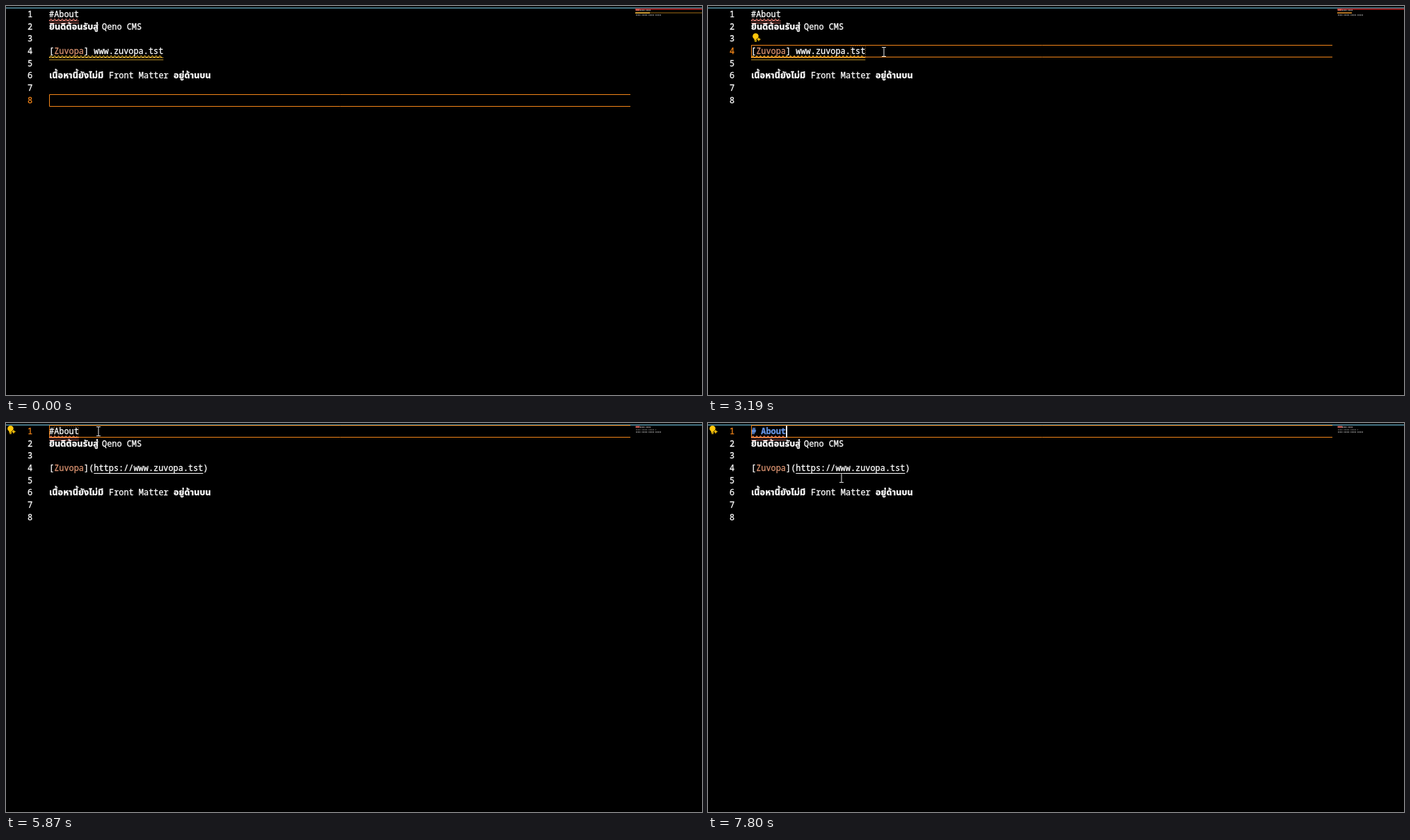
Animation of 1001x560 px, one loop 8000 ms. Source, as an HTML page with a canvas:

```html
<!DOCTYPE html>
<html lang="th">
<head>
<meta charset="utf-8">
<style>
html, body { margin: 0; width: 100%; height: 100%; overflow: hidden; background: #000 }
canvas { display: block }
</style>
</head>
<body>
<canvas id="stage" width="1001" height="560"></canvas>
<script>
const c = document.getElementById('stage').getContext('2d');
const LOOP = 8000, LEFT = 62, CHAR = 7.146, PITCH = 17.66;
const ORANGE = '#f38518', TEAL = '#6fc3df', YELLOW = '#ffc60a', SALMON = '#ec8478', GOLD = '#f2bd35';
const THAI = '"Noto Sans Thai", "Noto Sans", sans-serif';
const MONO = '11.91px "Noto Sans Mono", monospace';
const THAI_CODE = '600 12.8px ' + THAI;
const UI = '600 11.2px "Open Sans", sans-serif';
const THAI_UI = '600 12.1px ' + THAI;

const SELECT_LINK = 1660, HIGHLIGHT = 1790, BULB = 1990, MENU_LINK = 3250, FIX_LINK = 4535;
const SELECT_TITLE = 5410, BULB_TITLE = 5680, MENU_TITLE = 6270, FIX_TITLE = 7600;

// time, x, y of the pointer
const PATH = [
  [240, 640, 560], [980, 258, 66], [1120, 253, 66], [3850, 253, 66], [4190, 294, 105],
  [4535, 298, 112], [4670, 298, 112], [5070, 133, 12], [6840, 133, 12], [6869, 142, 12],
  [7300, 184, 86], [7460, 190, 77]
];

const within = (t, a, b) => t >= a && t < b;
const column = i => LEFT + i * CHAR;
const baseline = n => Math.round(16 + PITCH * (n - 1));

function text(s, x, y, color = '#fff', font = MONO) {
  c.font = font;
  c.fillStyle = c.strokeStyle = color;
  c.lineWidth = 0.3;
  c.fillText(s, x, y);
  c.strokeText(s, x, y);
}
function rect(x, y, w, h, color) {
  c.fillStyle = color;
  c.fillRect(x, y, w, h);
}
function frame(x, y, w, h, color, dash = []) {
  c.strokeStyle = color;
  c.lineWidth = 1;
  c.setLineDash(dash);
  c.strokeRect(x, y, w, h);
  c.setLineDash([]);
}
function rounded(x, y, w, h, r, stroke, fill) {
  c.beginPath();
  c.roundRect(x, y, w, h, r);
  if (fill) { c.fillStyle = fill; c.fill(); }
  c.strokeStyle = stroke;
  c.lineWidth = 1;
  c.stroke();
}

function squiggle(x0, x1, y, color) {
  c.beginPath();
  for (let x = x0, up = 0; x <= x1; x += 2.7, up ^= 1) c.lineTo(x, y + (up ? -1.3 : 1.3));
  c.strokeStyle = color;
  c.lineWidth = 1.1;
  c.stroke();
  c.globalAlpha = 0.75;
  rect(x0, y + 1, x1 - x0, 1, color);
  rect(x0, y + 4, x1 - x0, 1, color);
  c.globalAlpha = 1;
}

function star(x, y, r) {
  c.beginPath();
  for (let i = 0; i < 8; i++) {
    const a = i * Math.PI / 4, d = i % 2 ? r * 0.42 : r;
    c.lineTo(x + d * Math.cos(a), y + d * Math.sin(a));
  }
  c.closePath();
}
function bulb(x, y, sparkle) {
  c.fillStyle = YELLOW;
  c.beginPath();
  c.arc(x, y, 4.3, 0, 7);
  c.fill();
  c.fillRect(x - 2, y + 3, 4, 3);
  c.fillRect(x - 1.5, y + 6.5, 3, 1.3);
  if (!sparkle) return;
  star(x + 4.5, y + 4.5, 4.4);
  c.fillStyle = '#000';
  c.fill();
  star(x + 4.5, y + 4.5, 3.2);
  c.fillStyle = YELLOW;
  c.fill();
}
function sparkles(x, y) {
  c.strokeStyle = '#f0f0f0';
  c.lineWidth = 1.2;
  star(x - 2.5, y - 2, 4.3);
  c.stroke();
  star(x + 3.6, y + 2.8, 2.7);
  c.stroke();
}

function menu(x, y, w, h, fixes, pointer) {
  rounded(x, y, w, h, 4, TEAL, '#0c141f');
  text('Quick Fix', x + 11.5, y + 21.5, '#b4b8bc', UI);
  const inside = pointer.x > x && pointer.y > y;
  const focus = inside ? Math.floor((pointer.y - y - 29.8) / 22.5) : 0;
  const items = [...fixes, [['Fix', 34, UI]], [['Explain', 34, UI]]];
  items.forEach((parts, i) => {
    const mid = y + 39.5 + i * 22.5;
    if (i === focus) rounded(x + 4.5, mid - 11, w - 9, 21, 3, ORANGE);
    if (i < fixes.length) bulb(x + 19.5, mid - 2.5);
    else sparkles(x + 19.5, mid - 0.5);
    for (const [s, dx, font] of parts) text(s, x + dx, mid + 4.5, '#fff', font);
  });
}

function pointerAt(t) {
  const i = PATH.findIndex(p => p[0] > t);
  if (i < 0) { const [, x, y] = PATH[PATH.length - 1]; return t < 7800 ? { x, y } : { x: 192, y: 79 }; }
  if (i === 0) return null;
  const [t0, x0, y0] = PATH[i - 1], [t1, x1, y1] = PATH[i];
  const u = (t - t0) / (t1 - t0), e = u * u * (3 - 2 * u);
  return { x: x0 + (x1 - x0) * e, y: y0 + (y1 - y0) * e };
}
function drawPointer({ x, y }, arrow) {
  c.save();
  c.translate(Math.round(x), Math.round(y));
  c.beginPath();
  if (arrow) {
    for (const [px, py] of [[0, 0], [0, 13], [3, 10.3], [5, 15], [7, 14], [5, 9.6], [9, 9.4]]) c.lineTo(px, py);
    c.closePath();
    c.fillStyle = '#fff';
    c.strokeStyle = '#000';
    c.lineWidth = 1;
    c.stroke();
    c.fill();
  } else {
    c.moveTo(-3, -6.5); c.lineTo(3, -6.5);
    c.moveTo(0, -6.5); c.lineTo(0, 6.5);
    c.moveTo(-3, 6.5); c.lineTo(3, 6.5);
    c.strokeStyle = '#d8d8d8';
    c.lineWidth = 1.1;
    c.stroke();
  }
  c.restore();
}

function dots(x0, x1, y, color) {
  for (let x = x0, i = 0; x < x1; x += 1.4, i++) if (i % 7 !== 5) rect(x, y, 1, 1.5, color);
}
function minimap(active, linkFixed, titleFixed) {
  if (active !== 1) rect(905, 3.6, 96, 1.8, '#b51c1c');
  rect(905.5, 4.5, titleFixed ? 7 : 6, 2.2, '#e06a60');
  dots(912, 927, 5.2, '#b0a0a0');
  if (linkFixed) dots(906, 934, 9, '#5c5c5c');
  else {
    if (active === 8) rect(926, 9.2, 75, 1.3, '#7a5410');
    rect(905, 9, 21, 1.8, active === 8 ? '#e0aa38' : '#c47f26');
  }
  dots(906, 943, 12.3, '#8c8c8c');
}

function caret(x, n) {
  rect(x, Math.round(PITCH * (n - 1)) + 4, 2, 17, '#fff');
}

function draw(t) {
  const active = t < SELECT_LINK ? 8 : t < SELECT_TITLE ? 4 : 1;
  const linkFixed = t >= FIX_LINK, titleFixed = t >= FIX_TITLE;
  rect(0, 0, 1001, 560, '#000');
  rect(0, 2, 1001, 1.6, '#558fa2');

  for (let n = 1; n <= 8; n++) text(n, 31, baseline(n), n === active ? ORANGE : '#fff');

  const title = titleFixed ? '# About' : '#About';
  text(title, LEFT, baseline(1), titleFixed ? '#6796e6' : '#fff', (titleFixed ? 'bold ' : '') + MONO);
  text('ยินดีต้อนรับสู่', LEFT, baseline(2), '#fff', THAI_CODE);
  text('Qeno CMS', 138, baseline(2));
  text('[', LEFT, baseline(4));
  text('Zuvopa', column(1), baseline(4), '#d8916f');
  text(linkFixed ? '](https://www.zuvopa.tst)' : '] www.zuvopa.tst', column(7), baseline(4));
  text('เนื้อหานี้ยังไม่มี', LEFT, baseline(6), '#fff', THAI_CODE);
  text('Front Matter', 148, baseline(6));
  text('อยู่ด้านบน', 241, baseline(6), '#fff', THAI_CODE);

  squiggle(LEFT, column(title.length), 20, SALMON);
  if (linkFixed) rect(column(9), 72, 22 * CHAR, 1, '#fff');
  else squiggle(LEFT, column(23), 73, GOLD);

  const top = Math.round(3 + PITCH * (active - 1)) + 0.5;
  c.beginPath();
  c.moveTo(898, top); c.lineTo(LEFT + 0.5, top);
  c.lineTo(LEFT + 0.5, top + 17); c.lineTo(898, top + 17);
  c.strokeStyle = ORANGE;
  c.lineWidth = 1;
  c.stroke();

  if (within(t, HIGHLIGHT, FIX_LINK)) frame(205.5, 57.5, 21, 15, '#a8702c', [1, 2]);
  if (within(t, FIX_LINK, SELECT_TITLE)) for (const i of [8, 31]) frame(Math.round(column(i)) + 0.5, 57.5, 6, 15, '#5a9db3');
  if (within(t, SELECT_TITLE, FIX_TITLE)) frame(69.5, 5.5, 35, 14, '#a8702c', [1, 2]);

  if (within(t, SELECT_LINK, 2190) || within(t, 2730, 3190)) caret(226, 4);
  if (within(t, FIX_LINK, 5060)) caret(290, 4);
  if (within(t, SELECT_TITLE, 5870)) caret(104, 1);
  if (titleFixed) caret(112, 1);

  if (within(t, BULB, 4670)) bulb(68.5, 43.5, true);
  else if (within(t, 4670, BULB_TITLE)) bulb(70, 43.5);
  else if (t >= BULB_TITLE) bulb(6.5, 8, true);

  minimap(active, linkFixed, titleFixed);

  const pointer = pointerAt(t);
  if (within(t, MENU_LINK, FIX_LINK))
    menu(226.5, 75.5, 165, 100, [[['แก้ลิงก์ให้เป็น', 34, THAI_UI], ['[text](url)', 104.5, UI]]], pointer);
  if (within(t, MENU_TITLE, FIX_TITLE))
    menu(104.5, 23.5, 185, 121, [
      [['เพิ่ม', 34, THAI_UI], ['Front Matter', 57.5, UI], ['มาตรฐาน', 126.5, THAI_UI]],
      [['ใส่ช่องว่างหลัง', 34, THAI_UI], ['#', 109.5, UI]]
    ], pointer);

  if (pointer) drawPointer(pointer, within(t, 3980, 4670) || within(t, 6860, 7800));
}

const start = performance.now();
function tick() {
  draw((performance.now() - start) % LOOP);
  requestAnimationFrame(tick);
}
tick();
</script>
</body>
</html>
```
